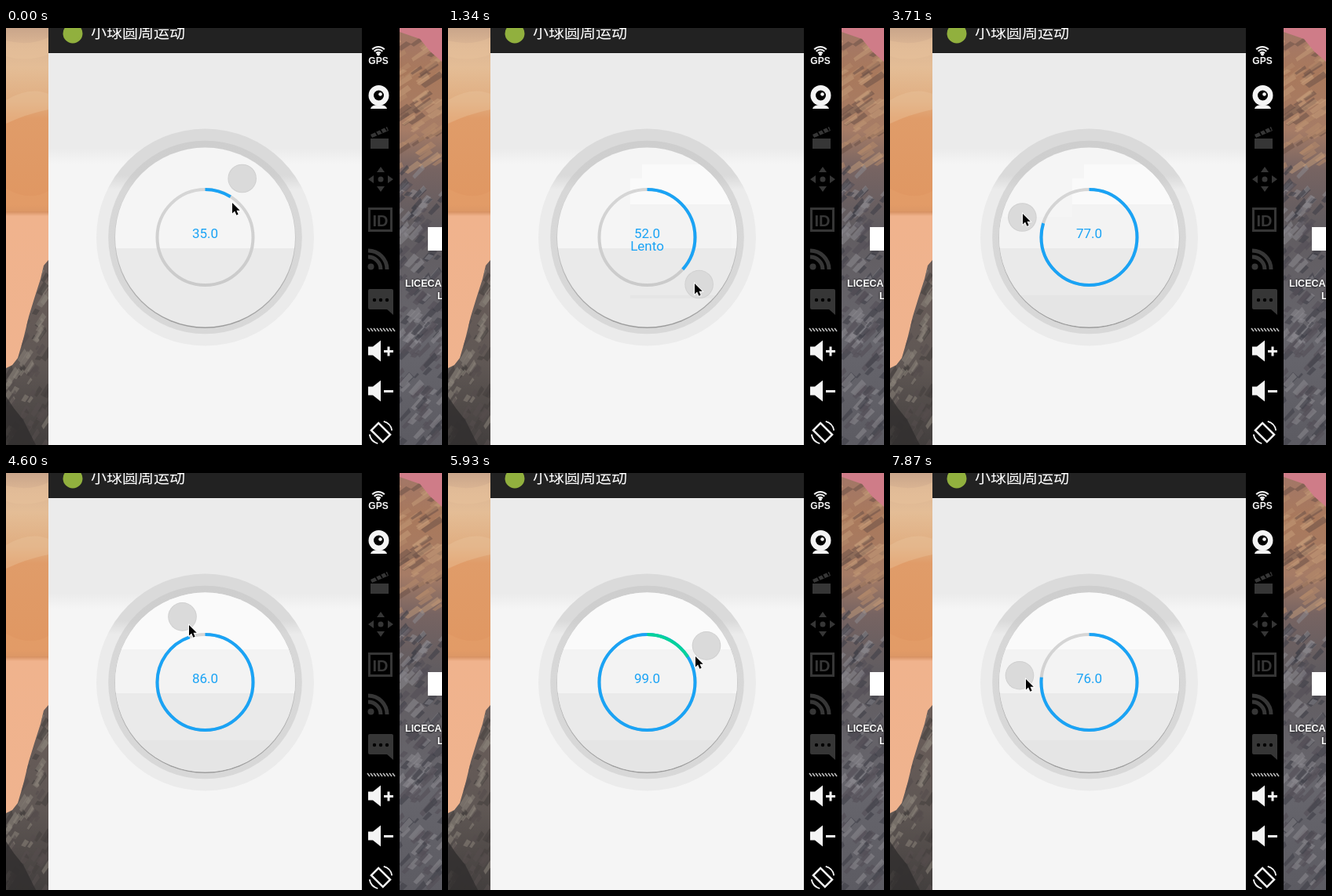
An HTML page with a canvas for the animation above (8 s loop, 555x532 px).

```html
<!DOCTYPE html>
<html lang="zh">
<head>
<meta charset="utf-8">
<title>小球圆周运动</title>
<style>
  html, body { margin: 0; width: 100%; height: 100%; overflow: hidden; background: #000; }
  canvas { display: block; }
</style>
</head>
<body>
<canvas id="stage" width="555" height="532"></canvas>
<script>
const ctx = document.getElementById('stage').getContext('2d');
const LOOP = 8000, STEPS = 54, TAU = Math.PI * 2;
const CX = 253.5, CY = 267;
const BLUE = '#1aa3f5', GREEN = '#05d39b';
const LABEL_FONT = '"Liberation Sans", Arial, sans-serif';
const TEMPO = { 46: 'Largo', 52: 'Lento', 66: 'Andante' };

// [step, knob angle in degrees clockwise from the top]
const KNOB = [[0, 32], [1, 38], [8, 122], [9, 132], [15, 195], [16, 209], [23, 275], [25, 287],
  [31, 341], [32, 347], [33, 355], [39, 414.5], [40, 418], [41, 424], [42, 420], [46, 361], [47, 347], [53, 276]];
// [step, pointer offset from the knob centre]
const POINTER = [[0, -13, 31], [9, -6, -1], [13, -6, 9], [16, -8, 0], [25, 1, -4], [31, 8, 11], [40, -14, 14], [53, 8, 5]];
// [step, x, y, width, height]: parts of the dial that get the finer shading
const SHADED = [[2, 247, 174, 114, 75], [6, 232, 192, 129, 153], [13, 212, 255, 150, 126],
  [20, 139, 241, 146, 135], [27, 139, 152, 230, 126]];

function sample(keys, step, column = 1) {
  const next = keys.findIndex(key => key[0] > step);
  if (next < 0) return keys[keys.length - 1][column];
  const a = keys[next - 1], b = keys[next];
  return a[column] + (b[column] - a[column]) * (step - a[0]) / (b[0] - a[0]);
}

function rect(x, y, w, h, color) {
  ctx.fillStyle = color;
  ctx.fillRect(x, y, w, h);
}
function disc(x, y, r, color) {
  ctx.fillStyle = color;
  ctx.beginPath();
  ctx.arc(x, y, r, 0, TAU);
  ctx.fill();
}
function arc(x, y, r, from, to, color, width) {
  ctx.strokeStyle = color;
  ctx.lineWidth = width;
  ctx.beginPath();
  ctx.arc(x, y, r, (from - 90) * TAU / 360, (to - 90) * TAU / 360);
  ctx.stroke();
}
function shape(path, color) {
  ctx.fillStyle = color;
  ctx.fill(new Path2D(path));
}
function line(path, color, width) {
  ctx.strokeStyle = color;
  ctx.lineWidth = width;
  ctx.stroke(new Path2D(path));
}
function text(string, x, y, font, color, align = 'center') {
  ctx.font = font;
  ctx.fillStyle = color;
  ctx.textAlign = align;
  ctx.fillText(string, x, y);
}
function vertical(y0, y1, ...stops) {
  const gradient = ctx.createLinearGradient(0, y0, 0, y1);
  stops.forEach(([at, color]) => gradient.addColorStop((at - y0) / (y1 - y0), color));
  return gradient;
}
function seeded(seed) {
  return () => (seed = seed * 16807 % 2147483647) / 2147483647;
}

// Rock texture: small slanted facets
function facets(x, y, w, h, count, colors, lean, seed) {
  const random = seeded(seed);
  for (let i = 0; i < count; i++) {
    const sx = x + random() * w, sy = y + random() * h;
    const height = 6 + random() * 16, width = 2 + random() * 5;
    shape(`M${sx} ${sy}l${width} ${height * .3}l${lean * height} ${height * .7}l${-width} ${-height * .2}z`,
      colors[i % colors.length]);
  }
}

function drawWallpaper() {
  rect(0, 0, 54, 532, vertical(0, 532, [0, '#c9a58a'], [22, '#dcb694'], [50, '#e4bd96'], [95, '#e0ad80'],
    [115, '#e09c69'], [225, '#e09762'], [234, '#d58f60'], [240, '#f0b38d'], [532, '#efb38f']));
  shape('M0 16Q30 24 54 12V34Q25 44 0 36ZM0 92Q30 74 54 84V104Q25 110 0 122Z', '#e9c39c66');
  shape('M0 205Q30 222 54 208V234H0Z', '#e5a06b88');
  ctx.save();
  ctx.clip(new Path2D('M54 296L48 303L44 320L36 345L29 368L22 397L15 421L8 430L0 434V532H54Z'));
  rect(0, 290, 54, 242, vertical(290, 532, [290, '#6b5e5a'], [430, '#5f5754'], [532, '#433f3e']));
  facets(0, 295, 56, 230, 110, ['#45403f99', '#8c837b88', '#554e4d99'], -.5, 17);
  shape('M0 470L10 485L22 500L33 522L38 532H0Z', '#302e2ecc');
  ctx.restore();

  rect(501, 0, 54, 532, vertical(0, 532, [0, '#a27768'], [60, '#a9795c'], [130, '#a67c66'],
    [180, '#776462'], [250, '#615c60'], [400, '#67666d'], [532, '#5c5b62']));
  facets(500, 0, 60, 175, 70, ['#caa07d77', '#6b514788', '#b68a6a88'], -1.1, 31);
  facets(500, 170, 60, 360, 170, ['#40404799', '#8c8b9088', '#544f5799'], -.7, 53);
  shape('M501 0H555V43L540 30L527 14L501 5Z', '#cf7c88');
}

function drawDesktopIcon() {
  rect(537, 254, 18, 30, '#fff');
  const font = 'bold 12.5px ' + LABEL_FONT;
  ctx.shadowColor = '#000';
  ctx.shadowBlur = 3;
  text('LICECA', 508, 330, font, '#fff', 'left');
  text('L', 549, 346, font, '#fff', 'left');
  ctx.shadowBlur = 0;
}

function drawSpeaker(y) {
  shape(`M461 ${y - 6}h6l10 -8v27l-10 -8h-6z`, '#f4f4f4');
  rect(481, y - 1.5, 12, 3, '#f4f4f4');
}

function drawToolbar() {
  const white = '#f4f4f4', grey = '#363636';
  rect(453, 0, 48, 532, '#000');

  [4, 7.5, 11].forEach(r => arc(474, 35, r, -45, 45, white, 2));
  disc(474, 33.5, 2, white);
  text('GPS', 474, 46, 'bold 12px ' + LABEL_FONT, white);

  disc(474.5, 86, 13, white);
  disc(474.5, 86, 6.5, '#000');
  disc(476.5, 84.5, 2.3, white);
  shape('M464 103Q465 98 474.5 98Q484 98 485 103Z', white);

  shape('M464 136L485 126L487 131L466 140ZM464 141H487V154H464Z', grey);
  line('M470 132l3 5M476 129l3 5M482 126l3 5', '#000', 1.5);

  shape('M477 177l5 7h-10zM477 209l5 -7h-10zM461 193l7 -5v10zM493 193l-7 -5v10z', grey);
  disc(477, 193, 3.5, grey);

  line('M462.5 230.5H490.5V258.5H462.5Z', grey, 3);
  text('ID', 476.5, 252.5, 'bold 20px ' + LABEL_FONT, grey);

  disc(464.5, 304.5, 4, grey);
  arc(461, 308, 16, 0, 90, grey, 5);
  arc(461, 308, 24, 0, 90, grey, 5);

  shape('M463 333H491Q493 333 493 335V366L485 359H463Q461 359 461 357V335Q461 333 463 333Z', grey);
  [469, 477, 485].forEach(x => disc(x, 347, 2.2, '#000'));

  for (let x = 460; x < 495; x += 4) line(`M${x} 383l3 4`, '#bbb', 1.6);

  drawSpeaker(412.5);
  rect(485.5, 406.5, 3, 12, white);
  drawSpeaker(463.5);

  ctx.save();
  ctx.translate(477, 516);
  ctx.rotate(-Math.PI / 4);
  line('M-6.5 -10.5H6.5V10.5H-6.5Z', white, 2.5);
  ctx.restore();
  arc(477, 516, 14.5, 15, 80, white, 1.8);
  arc(477, 516, 14.5, 195, 260, white, 1.8);
}

function drawApp() {
  rect(54, 32, 399, 500, vertical(32, 532, [32, '#ebebeb'], [154, '#ebebeb'], [174, '#f5f5f5'], [532, '#f5f5f5']));
  rect(54, 0, 399, 32, '#222');
  rect(54, 31, 399, 1, '#1a1a1a');
  disc(85, 7, 12.5, '#91b03e');
  text('小球圆周运动', 108, 12.5, '20px "Noto Sans CJK SC", "Noto Sans CJK", sans-serif', '#fff', 'left');
}

function drawDial(step) {
  disc(CX, CY, 138.5, vertical(129, 405, [129, '#dadada'], [188, '#dadada'], [206, '#ebebeb'], [405, '#ebebeb']));
  disc(CX, CY, 123.3, vertical(144, 390, [144, '#cecece'], [188, '#cfcfcf'], [206, '#d7d7d7'], [390, '#d8d8d8']));
  disc(CX, CY + .8, 115.2, vertical(152, 382, [152, '#cecece'], [270, '#c4c4c4'], [382, '#9c9c9c']));

  ctx.save();
  ctx.beginPath();
  ctx.arc(CX, CY, 114.5, 0, TAU);
  ctx.clip();
  rect(138, 152, 232, 129, '#f5f5f5');
  rect(138, 281, 232, 101, '#eaeaea');
  ctx.beginPath();
  SHADED.filter(area => step >= area[0]).forEach(([, ...box]) => ctx.rect(...box));
  ctx.clip();
  rect(138, 152, 232, 73, '#fafafa');
  rect(138, 225, 232, 56, '#f3f3f3');
  rect(138, 281, 232, 60, '#eaeaea');
  rect(138, 341, 232, 41, '#e5e5e5');
  ctx.restore();
}

function drawProgress(angle) {
  const ring = (to, color) => arc(CX, CY, 61, 0, to, color, 4);
  ring(360, vertical(205, 330, [205, '#d6d6d6'], [330, '#cacaca']));
  ring(Math.min(angle, 360), BLUE);
  if (angle > 360) ring(angle - 360, GREEN);

  const value = Math.floor(30 + angle / 6);
  const font = '17px Roboto, sans-serif';
  text(value.toFixed(1), CX, 268, font, BLUE);
  if (TEMPO[value]) text(TEMPO[value], CX, 284, font, BLUE);
}

function drawKnob(step, angle) {
  const radians = angle * TAU / 360;
  const x = CX + 89 * Math.sin(radians), y = CY + .5 - 89 * Math.cos(radians);
  disc(x, y, 18.3, '#d0d0d0');
  disc(x, y, 17.3, '#dadada');

  ctx.save();
  ctx.translate(Math.round(x + sample(POINTER, step, 1)), Math.round(y + sample(POINTER, step, 2)));
  ctx.scale(.87, .87);
  const arrow = 'M0 0V15.5L3.6 12.2L6.2 18L8.8 16.9L6.3 11.3H11.2Z';
  line(arrow, '#fff', 2);
  shape(arrow, '#000');
  ctx.restore();
}

function render(now) {
  const step = Math.floor(now % LOOP * STEPS / LOOP);
  const angle = sample(KNOB, step);
  drawWallpaper();
  drawDesktopIcon();
  drawApp();
  drawToolbar();
  drawDial(step);
  drawProgress(angle);
  drawKnob(step, angle);
}

const start = performance.now();
function tick() {
  render(performance.now() - start);
  requestAnimationFrame(tick);
}
tick();
</script>
</body>
</html>
```
